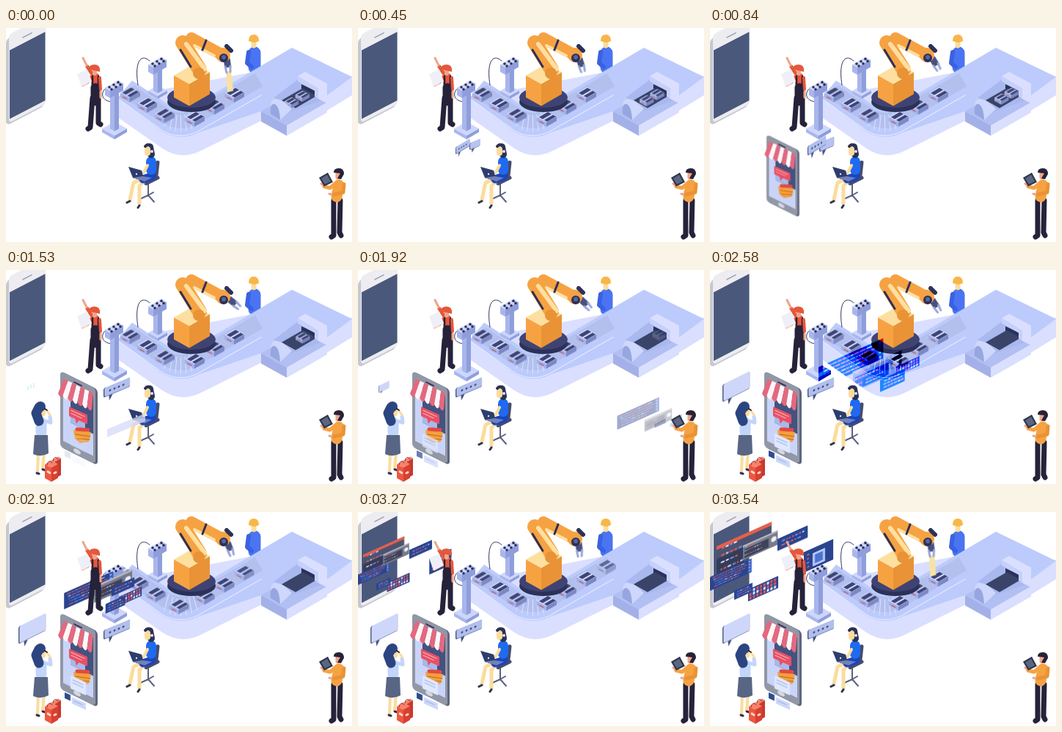
An HTML page for the animation above (3.57 s loop, 472 by 293 pixels).

```html
<!DOCTYPE html>
<html lang="en">
<head>
<meta charset="utf-8">
<title>Mobile app factory</title>
<style>
html, body { margin: 0; width: 100%; height: 100%; overflow: hidden; background: #fff; }
svg { display: block; width: 472px; height: 293px; }
</style>
</head>
<body>
<svg id="stage" viewBox="0 0 472 293"><rect width="472" height="293" fill="#fff"/></svg>
<script>
const NS = 'http://www.w3.org/2000/svg';
const LOOP = 3570;
const NAVY = '#2b3158', INK = '#25223a', SKIN = '#fbdc9c', PINK = '#f0a58c';
const ORANGE = '#f6a243', GOLD = '#fde0a0', RUST = '#e99336';
const PALE = '#dadfff', TOP = '#bccbfc', SHADE = '#a3b1e8';
const STEEL = ['#cdd6fc', '#a9b6ec', '#8f9edb'];
const stage = document.getElementById('stage');

// ---- drawing helpers

function add(parent, tag, attrs = {}) {
  const el = document.createElementNS(NS, tag);
  for (const k in attrs) el.setAttribute(k, attrs[k]);
  parent.appendChild(el);
  return el;
}
const group = (g = stage) => add(g, 'g');
const skew = (g, x, y, k) => add(g, 'g', { transform: `matrix(1 ${k} 0 1 ${x} ${y})` });
const shape = (g, fill, d) => add(g, 'path', { fill, d });
const rect = (g, fill, x, y, width, height, rx = 0) => add(g, 'rect', { fill, x, y, width, height, rx });
const dot = (g, fill, cx, cy, rx, ry = rx) => add(g, 'ellipse', { fill, cx, cy, rx, ry });
const limb = (g, stroke, width, d, cap = 'round') => add(g, 'path', {
  d, stroke, fill: 'none', 'stroke-width': width, 'stroke-linecap': cap, 'stroke-linejoin': 'round'
});

// block from its left corner: a runs down-right, b runs up-right
function block(g, x, y, a, b, h, [top, left, right]) {
  const fx = x + a, fy = y + a * .56, up = b * .58;
  shape(g, top, `M${x} ${y}L${fx} ${fy}l${b} ${-up}l${-a} ${-a * .56}Z`);
  if (!h) return;
  shape(g, left, `M${x} ${y}L${fx} ${fy}v${h}L${x} ${y + h}Z`);
  shape(g, right, `M${fx} ${fy}l${b} ${-up}v${h}L${fx} ${fy + h}Z`);
}

function product(g) {
  const p = group(g);
  block(p, -13, 2, 13, 14, 6, ['#cdd5fb', SHADE, '#7d89c4']);
  block(p, -10, 2, 5, 12, 0, ['#3c4576']);
  block(p, -3, 6, 4, 12, 0, ['#3c4576']);
  limb(p, '#c4524f', 1.2, 'M-9 8l5 2.5');
  return p;
}

function bubble(g, x, y, w, h, k, fill) {
  const b = skew(g, x, y, k);
  rect(b, '#44517f', 0, 0, w, h, 2.5);
  shape(b, '#44517f', `M${w * .2} ${h - 1}h6l-5 8Z`);
  rect(b, fill, 1.3, 0, w - 1.3, h - .6, 2.5);
  return b;
}

// ---- motion helpers

// steps: [ms, style]; the ends are held
function play(el, steps, easing = 'linear') {
  const frames = steps.map(([ms, style]) => ({ offset: ms / LOOP, easing, ...style }));
  const last = frames[frames.length - 1];
  if (frames[0].offset > 0) frames.unshift({ ...frames[0], offset: 0 });
  if (last.offset < 1) frames.push({ ...last, offset: 1 });
  el.animate(frames, { duration: LOOP, iterations: Infinity });
}
const place = (x, y, s = 1, opacity = 1) =>
  ({ transform: `translate(${x}px,${y}px) scale(${s})`, opacity });
const pop = (el, x, y, steps) => play(el, steps.map(([ms, s, opacity = 1, sy = s]) => [ms, {
  transform: `translate(${x}px,${y}px) scale(${s},${sy}) translate(${-x}px,${-y}px)`, opacity
}]));
const fade = (el, steps) => play(el, steps.map(([ms, opacity]) => [ms, { opacity }]));

let seed = 7;
const rand = () => (seed = seed * 16807 % 2147483647) / 2147483647;

// ---- large phone

const big = skew(stage, 0, 0, -.52);
rect(big, '#c6c8d0', 0, 15, 53, 119, 6);
rect(big, '#ededf1', 4, 11, 50, 121, 5);
rect(big, '#4a587c', 5, 33, 48.5, 94);
limb(big, '#9599a6', 1.5, 'M23 25h12');

// ---- man behind the line

const guard = group();
limb(guard, '#4a74f2', 17, 'M339 34V54');
limb(guard, '#3a62e0', 6, 'M331 33L329 48L335 53');
limb(guard, SKIN, 7, 'M338 19V24');
shape(guard, '#f9b648', 'M331 18Q331 9 338 9T345 18L339 20Z');

// ---- conveyor and exit

shape(stage, PALE, 'M152 96L390 50L472 66V92L383 147L348 127L266 168Q238 182 212 164L152 122Z');
shape(stage, TOP, 'M152 96L172 72L222 105Q240 115 258 105L390 27L472 67L383 133L348 114L263 143Q238 156 213 142Z');
limb(stage, '#b3c0ee', 21, 'M168 87L217 120Q239 133 260 120L345 71', 'butt');
limb(stage, '#e3e8ff', 1.3, 'M153 97L214 141Q238 154 263 141L348 92');
for (let i = 0; i < 7; i++) {
  const x = 222 + i * 5.5, y = 131 - ((i - 3) ** 2) * .8;
  limb(stage, '#dde4ff', 1, `M${x} ${y - 11}L${x + (i - 3) * 2} ${y + 11}`);
}

block(stage, 348, 114, 35, 55, 14, ['#b1bff2', SHADE, PALE]);
shape(stage, '#a9b8ee', 'M366 95L404 66L428 80V100L386 115Z');
shape(stage, NAVY, 'M403 77L424 87V95L403 87Z');
block(stage, 376, 99, 19, 29, 0, ['#394468']);
const exit = group();
shape(stage, PALE, 'M398 66L408 60L438 76V103L426 97V83Z');
shape(stage, '#c6d1fb', 'M398 66L426 83V97L421 94V86L398 73Z');
shape(stage, '#ced7fc', 'M361 118Q359 97 368 97Q377 97 390 111L374 126Z');
shape(stage, '#97a6df', 'M361 118Q359 104 366 104Q373 106 374 126Z');

// place i along the belt: down the left leg, then up the right one
const belt = i => i < 4 ? [145 + 23.5 * i, 72 + 14.5 * i] : [257 + 27 * (i - 4), 120 - 16.5 * (i - 4)];
for (let i = 0; i < 7; i++) {
  const from = place(...belt(i), 1, i ? 1 : 0), [x, y] = belt(i + 1), leaves = i === 6;
  play(product(stage), [
    [0, from], [2580, from],
    ...(i === 3 ? [[2920, place(236, 125)]] : []),
    [3240, place(x, y, 1, leaves ? .8 : 1)],
    [3510, place(x, y, 1, leaves ? 0 : 1)]
  ]);
}
for (const i of [0, 1])
  play(product(exit), [[0, place(389 + 15 * i, 99 - 9 * i, .72)],
    [1500 - 300 * i, place(404 + 10 * i, 90 - 6 * i, .72)], [2100 - 600 * i, place(414, 84, .72, 0)]]);

// ---- robot

dot(stage, NAVY, 253, 101, 33, 14);
dot(stage, '#3f4373', 253, 95, 33, 14);
block(stage, 229, 65, 21, 28, 30, [GOLD, ORANGE, RUST]);
limb(stage, ORANGE, 20, 'M241 20L264 57');
limb(stage, GOLD, 6, 'M246 22L271 56');
limb(stage, NAVY, 3, 'M238 30L252 53');
dot(stage, RUST, 263, 62, 8);
limb(stage, ORANGE, 16, 'M253 14L292 35');
limb(stage, GOLD, 4, 'M257 24L284 38');
limb(stage, NAVY, 3, 'M273 17L268 30');
const grip = group();
const spark = shape(grip, '#f8e2a2', 'M300 60L307 59L310 86L302 88Z');
limb(grip, '#47507f', 9, 'M301 42L303 54', 'butt');
limb(grip, '#98a5d8', 3, 'M299 53L301 61M306 52L306 60');
dot(stage, ORANGE, 296, 37, 10);
dot(stage, NAVY, 297, 41, 6);
dot(stage, '#59659b', 297, 40, 3);
limb(stage, NAVY, 6, 'M301 25L307 31');

play(grip, [[0, 0], [150, 0], [840, -22], [1530, -42], [2580, -24], [3270, 2], [3540, 2]]
  .map(([ms, a]) => [ms, { transform: `translate(299px,37px) rotate(${a}deg) translate(-299px,-37px)` }]), 'ease-in-out');
fade(spark, [[150, 1], [240, 0], [3330, 0], [3420, 1]]);

// ---- consoles

function post(x, y, h, base) {
  block(stage, x - base / 2, y + h, base / 2, base / 2, base / 7, STEEL);
  block(stage, x - 6, y, 6, 6, h, STEEL);
  block(stage, x - 13, y + 2, 7, 18, 10, STEEL);
  for (let i = 0; i < 6; i++) dot(stage, NAVY, x - 7 + i % 3 * 6 + (i > 2 ? 3 : 0), y + 1 - i % 3 * 3.3 + (i > 2 ? 3 : 0), 1.8);
}
limb(stage, NAVY, 1, 'M180 78C175 46 184 34 196 45');
post(207, 48, 38, 26);
limb(stage, NAVY, 1, 'M138 81C128 87 129 101 146 101');
post(148, 80, 58, 34);

// ---- app windows, drawn behind the workers

const panels = group();

function lines(g, w, h, rows) {
  for (let r = 0; r < rows; r++) {
    const end = w * (.65 + rand() * .3);
    for (let x = 4 + rand() * w * .1; x < end;) {
      const len = 2 + rand() * w * .08;
      rect(g, ['#ec655c', '#ec655c', '#e6eaff', '#7894f0'][Math.floor(rand() * 4)], x, 5 + r * (h - 6) / rows, len, 2);
      x += len + 2;
    }
  }
}
const draw = {
  code(g, w, h) {
    rect(g, '#2a4490', 0, 0, w, h, 1);
    lines(g, w, h, Math.round(h / 8));
  },
  editor(g, w, h) {
    draw.code(g, w, h);
    rect(g, '#3b5fc0', w - 11, 0, 11, h);
    for (let y = 7; y < h; y += 9) dot(g, '#c4d0fb', w - 6, y, 2);
  },
  photo(g, w, h) {
    rect(g, '#777b8a', 0, 0, w, h);
    rect(g, '#b4b6c2', 0, 0, w, 5);
    rect(g, '#3c435c', 4, h * .3, w * .7, h * .6);
    lines(g, w * .6, h, 3);
    dot(g, '#eff0f6', w - 10, h * .5, 7);
  },
  page(g, w, h) {
    rect(g, '#4b5370', 0, 0, w, h * .5);
    rect(g, '#343c5a', 0, h * .4, w * .5, h * .6);
    rect(g, '#e4604c', 0, 0, w, 5);
    lines(g, w * .5, h, 4);
  },
  strip(g, w, h) {
    rect(g, '#2a4490', 0, 0, w, h);
    for (let i = 0; i < 24; i++)
      rect(g, rand() < .55 ? '#e85b58' : '#e8ecff', 2 + i % 8 * 5.3, 2 + Math.floor(i / 8) * 5.4, 3.2, 4);
  },
  icon(g, w, h) {
    rect(g, '#2a4490', 0, 0, w, h);
    rect(g, '#b8c9f7', 12, 7, 17, 18);
    rect(g, '#4b74cf', 15, 10, 11, 12);
    lines(g, 10, h, 4);
  }
};

// kind, size, first spot by the tablet, last spot by the phone and its scale
const windows = [
  ['page', 75, 44, 0, 0, 9, 47, 1],
  ['editor', 126, 42, 249, 190, 0, 89, .45],
  ['photo', 94, 40, 316, 201, 45, 46, .5],
  ['code', 45, 18, 335, 215, 92, 37, .92],
  ['strip', 45, 18, 400, 189, 52, 106, .9],
  ['code', 48, 24, 369, 219, 33, 108, .52],
  ['icon', 40, 28, 0, 0, 128, 55, 1]
];
windows.forEach(([kind, w, h, x, y, px, py, s], i) => {
  const win = group(panels);
  draw[kind](skew(win, 0, 0, -.45), w, h);
  const start = 1650 + 30 * i;
  play(win, [
    ...(x ? [[start, place(440, 208, 0, 0)], [2190, place(x, y)],
      [2580, place(148 + (x - 249) * .7, 133 + (y - 190) * .6, .7)]]
      : [[2880, place(px * .6, 70, 0, 0)]]),
    [3270, place(px * .76, 80 + (py - 80) * .65, s * .75)],
    [3540, place(px, py, s)]
  ], 'ease-in-out');
});

// the windows burn into the belt while they cross it
const blend = mixBlendMode => ({ mixBlendMode });
play(panels, [[0, blend('normal')], [2400, blend('normal')], [2400, blend('color-burn')],
  [2760, blend('color-burn')], [2760, blend('normal')]]);

// ---- worker

limb(stage, INK, 7, 'M118 96L115 136L112 138M126 96L126 130L129 132');
limb(stage, '#e4583c', 5, 'M118 64L111 53M117 67L111 74');
limb(stage, PINK, 3, 'M110 51L105 41M111 75L104 79');
limb(stage, '#e4583c', 11, 'M122 67V84');
limb(stage, INK, 13, 'M122 82V100');
limb(stage, INK, 2.5, 'M118 66V80M126 66V80');
limb(stage, '#e4583c', 4, 'M128 68L129 84');
limb(stage, PINK, 3, 'M129 87V95');
limb(stage, PINK, 6, 'M121 58V62');
shape(stage, '#e4583c', 'M112 57Q113 50 121 50T128 60L120 58Z');
shape(stage, '#eff0f7', 'M97 63L111 57L117 73L103 80Z');

// ---- chat bubble by the console

const chatBack = group();
bubble(chatBack, 149, 157, 20, 13, -.42, '#b7c3f2');
const chat = group();
const dots = bubble(chat, 133, 162, 36, 13, -.42, '#b1bfee');
for (let i = 0; i < 4; i++) dot(dots, NAVY, 9 + i * 6, 6.5, 1.3);
pop(chat, 133, 168, [[150, 0], [540, .7, 1, 1], [840, .7, 1, 1], [1100, 1]]);
pop(chatBack, 160, 160, [[210, 0], [540, 1], [840, 1], [1100, 1, 0]]);

// ---- woman with laptop

limb(stage, '#5a6180', 2, 'M194 214V230M194 229L181 235M194 229L202 238M194 229L201 225');
limb(stage, '#454c6e', 5, 'M191 213L207 205M207 184L205 202');
limb(stage, SKIN, 5, 'M186 206L174 212L169 235M188 210L182 216L182 241');
limb(stage, NAVY, 3, 'M169 237L165 239M182 243L180 246');
limb(stage, '#1b45bd', 11, 'M199 203L187 207');
limb(stage, '#1f6af0', 14, 'M198 183V194');
limb(stage, SKIN, 4, 'M193 188L188 198L182 199');
limb(stage, NAVY, 10, 'M196 163L198 173');
limb(stage, SKIN, 8, 'M193 166V171');
limb(stage, NAVY, 4, 'M190 162Q194 157 199 163');
dot(stage, '#dfe4ff', 199, 169, 2);
shape(stage, '#2c3d6e', 'M167 190L185 195L189 210L173 205Z');
shape(stage, '#7282b6', 'M173 205L189 210L199 205L186 203Z');
dot(stage, '#dfe4ff', 178, 200, 1.2);

const ghost = group();
rect(skew(ghost, 138, 218, -.42), '#d4dbf8', 0, 0, 52, 11);
fade(ghost, [[1350, 0], [1530, .75], [1680, 0]]);

// ---- shop phone

const shop = group();
const face = skew(shop, 74, 138, .5);
rect(face, '#5f6580', 1, 0, 50, 104, 5);
rect(face, '#9297a6', 0, 0, 48, 104, 5);
rect(face, '#c9d4f8', 4, 12, 41, 82);
rect(face, '#44527f', 14, 12, 31, 52);
rect(face, '#a9b8ea', 14, 46, 20, 18);
dot(face, '#d3d7e4', 23, 99, 5, 3);
limb(face, NAVY, 1.8, 'M19 6h10');
for (let i = 0; i < 7; i++) {
  const x = 79 + i * 5.7, y = 149 + i * 2.8, b = 71 + i * 6.6, c = 169 + i * 3;
  shape(shop, i % 2 ? '#fff6f7' : '#e4687f', `M${x} ${y}l5.7 2.8L${b + 6.6} ${c + 3}q-2 6-6.6-3Z`);
}
const note = skew(shop, 86, 187, .45);
rect(note, '#e85164', 0, 0, 25, 13, 1);
shape(note, '#e85164', 'M8 12h6l-4 7Z');
limb(note, '#fbc3c9', 1, 'M3 4h18M3 8h14');
shape(shop, '#f3a03f', 'M92 219L116 222L113 235L101 237L94 231Z');
limb(shop, '#e24a3f', 5, 'M97 218L112 219');
limb(shop, '#c5651d', 1, 'M95 225L115 228M97 231L114 232');
pop(shop, 99, 201, [[570, 0], [840, .88], [1080, 1]]);

const receipt = group();
const slip = skew(receipt, 80, 220, .45);
rect(slip, '#dfe8ff', 8, 0, 21, 18);
rect(slip, '#2f4b92', 0, 27, 8, 8);
rect(slip, '#ccd9fb', 10, 29, 19, 9);
limb(slip, '#96a7db', 1, 'M11 5h14M11 9h14M13 33h11');
fade(receipt, [[1440, 0], [2100, 1]]);

// ---- shopper

const shopper = group();
limb(shopper, SKIN, 4, 'M44 250L43 276M52 250L50 271');
limb(shopper, NAVY, 3, 'M42 278L45 279M50 273L53 274');
limb(shopper, '#c3d5fa', 15, 'M48 209L48 222');
limb(shopper, '#c3d5fa', 5, 'M55 207L61 209L60 201');
shape(shopper, '#596584', 'M39 226H57L58 251Q48 257 37 252Z');
limb(shopper, SKIN, 3, 'M60 198L56 193');
limb(shopper, SKIN, 8, 'M50 191V196');
limb(shopper, '#2b4580', 13, 'M45 188L41 196L45 207');
dot(shopper, '#2b4580', 47, 187, 7);
limb(shopper, INK, 2, 'M53 190L56 192');
block(shopper, 60, 262, 4, 11, 23, ['#f8836c', '#d8402f', '#c53a30']);
block(shopper, 53, 266, 9, 9, 19, ['#f8836c', '#ee5740', '#d8402f']);
limb(shopper, '#8c2a2d', 1, 'M56 267q2-9 7-3M64 261q2-8 7-2');
limb(shopper, '#ffd6c9', 3, 'M57 276l3 2M66 278l2-1');
pop(shopper, 50, 280, [[1110, 0, 0], [1320, .8, 1], [1500, 1, 1]]);

const waves = group();
limb(waves, '#8ee0c4', 1, 'M30 159v6M34 157v5M38 155v6');
fade(waves, [[1440, 0], [1530, .6], [1590, 0]]);

const speech = group();
bubble(speech, 17, 157, 37, 24, -.5, '#ced7fa');
pop(speech, 35, 160, [[1560, 0], [2190, .68], [2580, 1]]);

// ---- man with tablet

limb(stage, INK, 7, 'M447 236L447 284L444 286M456 236L455 280L457 284');
limb(stage, ORANGE, 15, 'M454 215L451 231');
limb(stage, RUST, 5, 'M461 214L460 225L447 228');
limb(stage, ORANGE, 5, 'M449 213L442 219L434 217');
limb(stage, PINK, 3, 'M432 215L430 213M444 228L441 227');
limb(stage, PINK, 7, 'M453 199V204');
shape(stage, INK, 'M447 198Q447 192 454 192T461 200L457 207L452 206L456 199Z');
shape(stage, '#2f374c', 'M427 205L439 198L446 211L434 217Z');
shape(stage, '#596784', 'M430 206L438 201L443 210L435 214Z');
</script>
</body>
</html>
```
